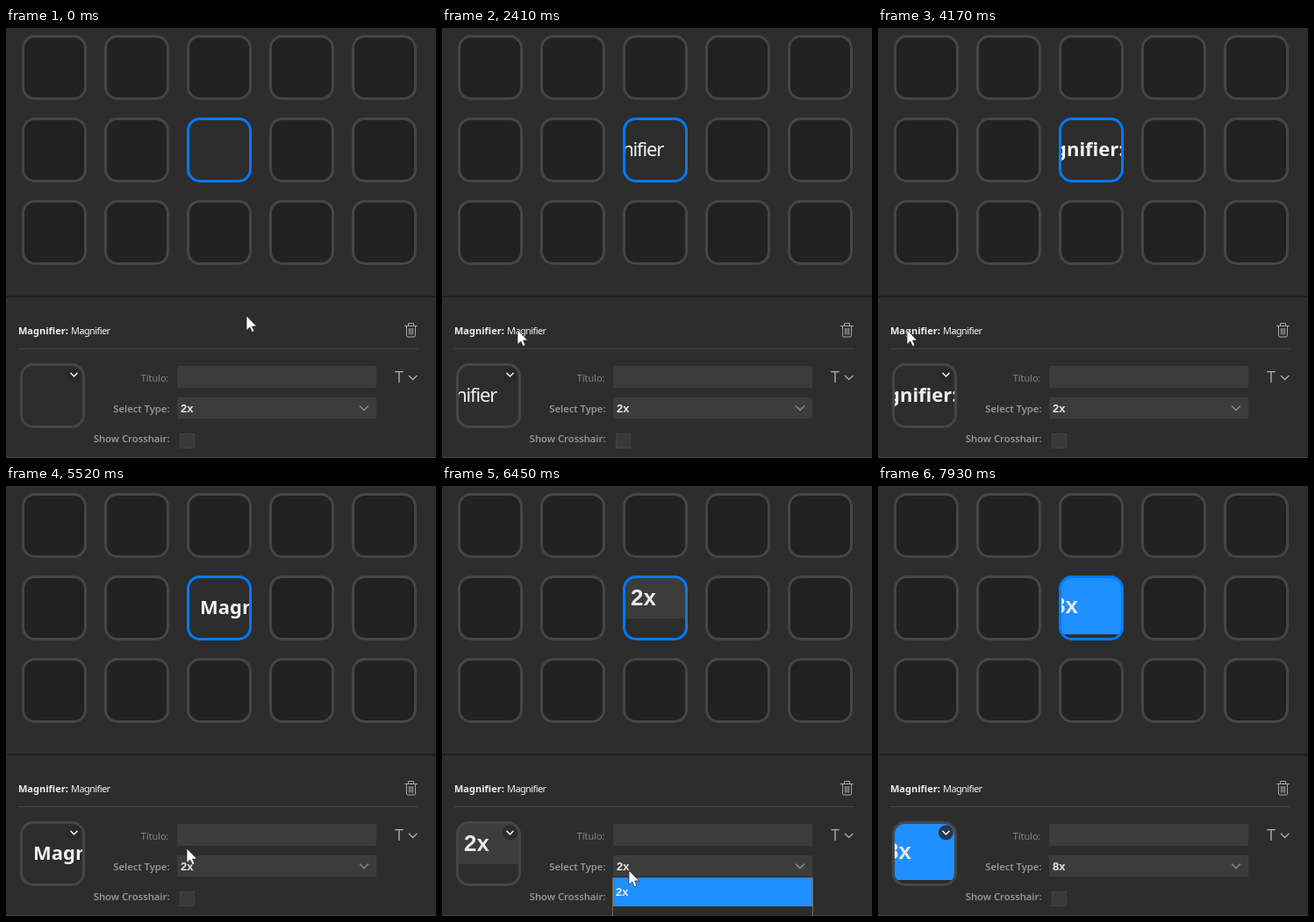
An HTML page for the animation above (8 s loop, 490x490 px).

```html
<!DOCTYPE html>
<html lang="pt">
<head>
<meta charset="utf-8">
<title>Magnifier panel</title>
<style>
html, body { margin: 0; width: 100%; height: 100%; overflow: hidden; background: #2d2d2d; }
svg { display: block; width: 490px; height: 490px; }
.head { font: 11px "Noto Sans", sans-serif; fill: #f0f0f0; letter-spacing: -.6px; }
.strong { font-weight: 700; letter-spacing: 0; }
.label { font: 600 11.3px "Open Sans", sans-serif; fill: #9c9c9c; text-anchor: end; }
.light { font-weight: 400; font-size: 11px; fill: #8c8c8c; }
.value { font: bold 13px "Liberation Sans", Arial, sans-serif; fill: #e8e8e8; }
.icon { font: 18px "Open Sans", sans-serif; fill: #a8a8a8; }
.line { fill: none; stroke: #a8a8a8; }
</style>
</head>
<body>
<svg id="stage" viewBox="0 0 490 490"></svg>
<script>
const LOOP = 8000;
const OPTIONS = ['2x', '4x', '8x'];
const ROW = 32, LIST_TOP = 447;
const OPEN = 6370, CLOSE = 7930;
const FIRST_SHOT = 1630, SHOT_EVERY = 1020;

// Pointer glides: start, end, then where the tip comes to rest
const HOME = { x: 274, y: 328 };
const GLIDES = [
  { from: 200, to: 980, x: 114, y: 344 },
  { from: 2090, to: 2410, x: 86, y: 344 },
  { from: 2900, to: 3640, x: 52, y: 344 },
  { from: 3970, to: 4500, x: 25, y: 344 },
  { from: 5090, to: 5680, x: 213, y: 438 },
  { from: 6740, to: 7260, x: 220, y: 527 }
];

const clamp = (v, lo, hi) => Math.max(lo, Math.min(hi, v));
const rect = (x, y, w, h, fill) =>
  `<rect x="${x}" y="${y}" width="${w}" height="${h}" fill="${fill}"/>`;
const text = (cls, x, y, s) => `<text class="${cls}" x="${x}" y="${y}">${s}</text>`;
const frame = (x, y, fill, stroke) =>
  `<rect x="${x + 1.5}" y="${y + 1.5}" width="71" height="71" rx="13.5" fill="${fill}" stroke="${stroke}" stroke-width="3"/>`;

function grid() {
  let out = '';
  for (let i = 0; i < 15; i++)
    if (i !== 7) out += frame(18 + i % 5 * 94, 8 + Math.floor(i / 5) * 94, '#222', '#464646');
  return out;
}

function optionList(hot) {
  const height = OPTIONS.length * ROW + 10;
  const rows = OPTIONS.map((name, i) => {
    const y = LIST_TOP + i * ROW;
    return (i === hot ? rect(195, y, 227, ROW, '#1e90ff') : '') + text('value', 198, y + 20, name);
  }).join('');
  return `<g id="list${hot}">
    <rect x="194.5" y="446.5" width="228" height="${height}" fill="#2d2d2d" stroke="#7a6a4c"/>${rows}</g>`;
}

const panel = `<g id="panel">
  ${text('head strong', 14, 348.5, 'Magnifier:')}
  ${text('head', 74, 348.5, 'Magnifier')}
  ${rect(14, 365, 456, 1, '#444')}
  ${text('label light', 185.5, 402.5, 'Título:')}
  ${text('label', 186.5, 438, 'Select Type:')}
  ${text('label', 186.5, 472, 'Show Crosshair:')}
  ${rect(195, 385, 227, 25, '#3c3c3c')}
  ${rect(195, 421, 227, 24, '#3c3c3c')}
  <rect x="198.5" y="462.5" width="16" height="16" fill="#3a3a3a" stroke="#424242"/>
  <g id="choice">${text('value', 199, 437.5, '')}</g>
  <path class="line" style="stroke:#8c8c8c" stroke-width="1.4" d="M403 430.5l5 5 5-5"/>
  </g>`;

const icons = `<g class="line">
  <path d="M454 339.5h15M458.5 339v-2.500h6v2.500M456.500 340v10.500q0 1.500 1.500 1.500h7q1.500 0 1.500-1.500v-10.500M459.500 342v7.500M461.500 342v7.500M463.500 342v7.500"/>
  <path stroke-width="1.5" d="M459 396l4.700 4.500 4.700-4.500"/></g>
  ${text('icon', 443, 404, 'T')}`;

document.getElementById('stage').innerHTML = `
  <defs>
    ${OPTIONS.map((_, i) => optionList(i)).join('')}
    <clipPath id="lens"><rect x="208" y="104" width="70" height="70" rx="12"/></clipPath>
    <filter id="soft" x="0" y="0" width="490" height="490" filterUnits="userSpaceOnUse"><feGaussianBlur stdDeviation=".45"/></filter>
    <g id="shot" clip-path="url(#lens)"><g filter="url(#soft)"><g id="zoom">
      <use href="#panel"/><use id="shotMenu"/>
    </g></g></g>
  </defs>
  ${rect(0, 0, 490, 490, '#2d2d2d')}
  ${rect(0, 489, 490, 1, '#424242')}
  ${grid()}
  ${rect(0, 305, 490, 2, '#1e1e1e')}
  ${panel}${icons}
  <use href="#shot"/>
  ${frame(206, 102, 'none', '#007aff')}
  <use href="#shot" x="-190" y="280"/>
  ${frame(16, 382, 'none', '#464646')}
  <circle cx="77.5" cy="395" r="8.5" fill="#292929" fill-opacity=".85"/>
  <path d="M73.5 393l4 4 4-4" fill="none" stroke="#f4f4f4" stroke-width="1.5"/>
  <use id="menu"/>
  <path id="pointer" d="M0 0V16.5L3.8 13 6.3 18.6 9 17.4 6.5 12H11.6Z" fill="#fff" stroke="#222" stroke-width=".7"/>`;

const el = id => document.getElementById(id);
const choice = el('choice').firstChild;
const show = (id, on) => el(id).setAttribute('visibility', on ? 'visible' : 'hidden');

// Each glide slows down sideways while it moves evenly up or down
function tip(t) {
  let { x, y } = HOME;
  for (const g of GLIDES) {
    const u = clamp((t - g.from) / (g.to - g.from), 0, 1);
    x += (g.x - x) * (1 - (1 - u) ** 2.5);
    y += (g.y - y) * u;
  }
  return { x: Math.round(x), y: Math.round(y) };
}

function setMenu(id, t) {
  const hot = clamp(Math.floor((tip(t).y - LIST_TOP) / ROW), 0, OPTIONS.length - 1);
  el(id).setAttribute('href', '#list' + hot);
  show(id, t >= OPEN && t < CLOSE);
}

function draw(t) {
  const { x, y } = tip(t);
  el('pointer').setAttribute('transform', `translate(${x} ${y})`);
  setMenu('menu', t);
  choice.textContent = OPTIONS[t < CLOSE ? 0 : 2];

  // The lens keeps the view it took at its latest refresh
  const taken = t - (t - FIRST_SHOT) % SHOT_EVERY;
  const centre = tip(taken);
  setMenu('shotMenu', taken);
  el('zoom').setAttribute('transform',
    `translate(${243 - 2 * centre.x} ${137 - 2 * centre.y}) scale(2)`);
  el('zoom').setAttribute('display', t < FIRST_SHOT ? 'none' : 'inline');
}

function tick() {
  draw(performance.now() % LOOP);
  requestAnimationFrame(tick);
}
tick();
</script>
</body>
</html>
```
